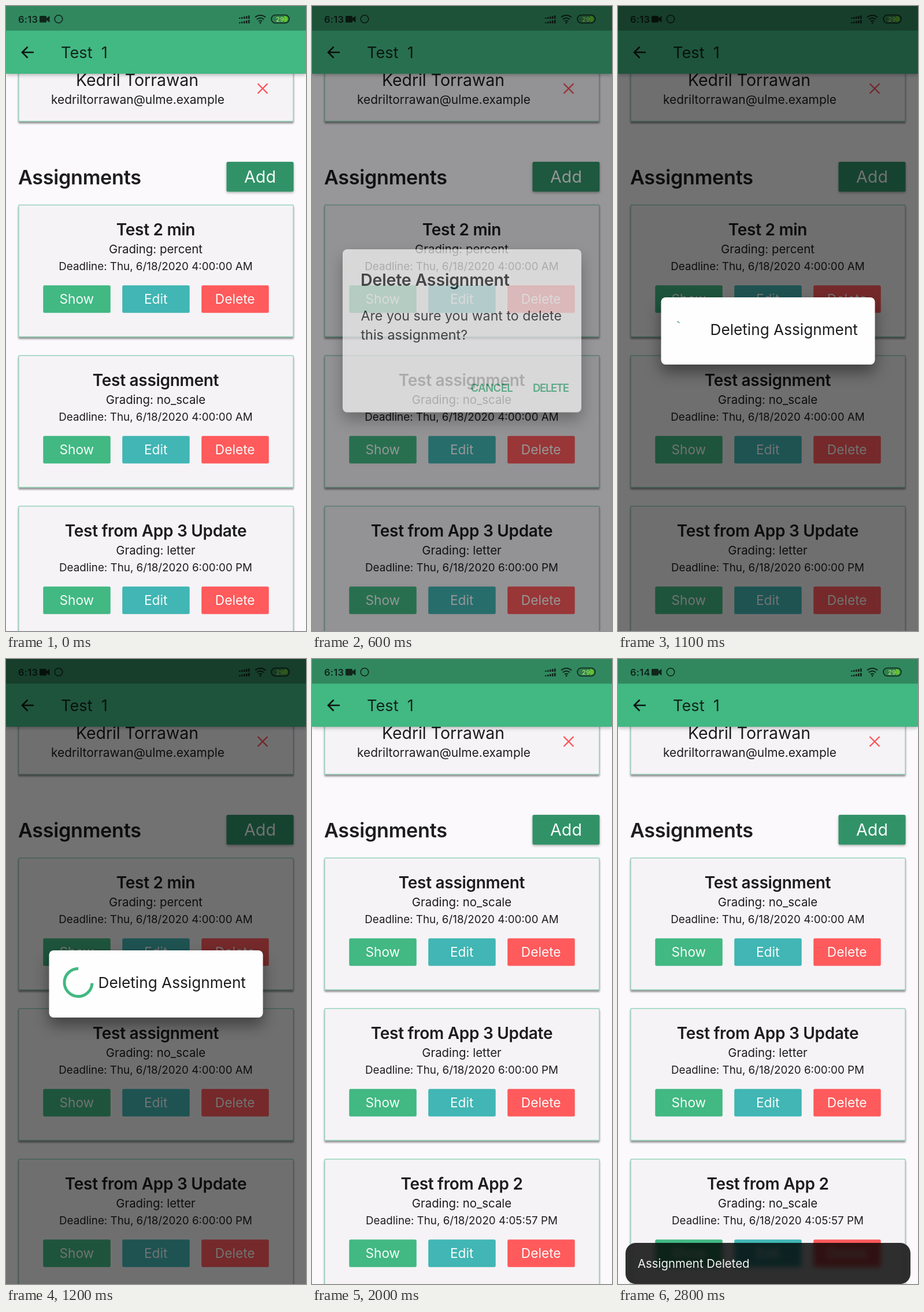
An HTML page for the animation above (2.9 s loop, 519 px wide and 1079 px high).

```html
<!DOCTYPE html>
<html lang="en">
<head>
<meta charset="utf-8">
<title>Delete assignment</title>
<style>
  html, body { margin: 0; width: 100%; height: 100%; overflow: hidden; background: #fbf9fc; }
  svg { position: absolute; left: 0; top: 0; display: block; }
  text { font-family: Inter, "Open Sans", sans-serif; white-space: pre; }
  .card { fill: #f5f3f6; stroke: #93d3b6; stroke-width: 1.3; filter: drop-shadow(0 3px 1.8px rgba(0,0,0,.42)); }
  .raised { filter: drop-shadow(0 2px 2px rgba(0,0,0,.3)); }
  .bar { filter: drop-shadow(0 2px 3px rgba(0,0,0,.28)); }
  .modal { fill: #fffeff; filter: drop-shadow(0 13px 13px rgba(0,0,0,.42)); }
  #snack {
    position: absolute; left: 13px; top: 1007.5px; width: 471.5px; height: 71.5px;
    padding-left: 21px; border-radius: 18px; line-height: 71px;
    font-family: Inter, "Open Sans", sans-serif; font-size: 20.4px; color: #f2f2f2;
    background: rgba(0,0,0,.81); backdrop-filter: blur(4px); white-space: pre;
  }
</style>
</head>
<body>
<svg id="stage" width="519" height="1079" viewBox="0 0 519 1079"></svg>
<div id="snack">Assignment Deleted</div>
<script>
const LOOP = 2900, STEP = 100;
const INK = '#1d1c1e', GREEN = '#42b883', TEAL = '#41b6b4', RED = '#ff5a5c';

const label = (x, y, size, str, { fill = INK, weight = 400, anchor = 'start', spacing = 0, id = '' } = {}) =>
  `<text ${id && `id="${id}"`} x="${x}" y="${y}" font-size="${size}" fill="${fill}" font-weight="${weight}"
    text-anchor="${anchor}" letter-spacing="${spacing}">${str}</text>`;
const centred = (x, y, size, str, more) => label(x, y, size, str, { anchor: 'middle', ...more });
const rect = (x, y, w, h, fill, r = 0, cls = '') =>
  `<rect x="${x}" y="${y}" width="${w}" height="${h}" rx="${r}" fill="${fill}" class="${cls}"/>`;
const line = (d, stroke, width) => `<path d="${d}" fill="none" stroke="${stroke}" stroke-width="${width}"/>`;

const button = (x, y, str, fill) =>
  rect(x, y, 116.5, 47.5, fill, 2.5) + centred(x + 58, y + 31.5, 22.7, str, { fill: '#f7fbf9' });

function card(y, [title, grading, deadline]) {
  return rect(22, y + .5, 475, 227.5, '', 1, 'card') +
    centred(259, y + 52.5, 28, title, { weight: 600, spacing: -.3 }) +
    centred(259, y + 84, 20.4, `Grading: ${grading}`) +
    centred(259, y + 113, 18.8, `Deadline: Thu, 6/18/2020 ${deadline}`) +
    button(64.3, y + 139.3, 'Show', GREEN) +
    button(201.2, y + 139.3, 'Edit', TEAL) +
    button(338.2, y + 139.3, 'Delete', RED);
}

const assignments = [
  ['Test 2 min', 'percent', '4:00:00 AM'],
  ['Test assignment', 'no_scale', '4:00:00 AM'],
  ['Test from App 3 Update', 'letter', '6:00:00 PM'],
  ['Test from App 2', 'no_scale', '4:05:57 PM'],
];
const cardList = first =>
  assignments.slice(first, first + 3).map((item, i) => card(343 + i * 260, item)).join('');

function statusBar() {
  const dark = '#10251b';
  let signal = '';
  for (let i = 0; i < 5; i++) {
    const x = 403 + i * 4;
    signal += rect(x, 20 - i * .9, 2.6, 2 + i * .9, dark) + rect(x, 28 - i, 2.6, 2 + i, dark);
  }
  return rect(0, 0, 519, 42.5, '#31885f') +
    label(21, 29, 16.5, '6:13', { fill: dark, weight: 600, spacing: .2, id: 'clock' }) +
    rect(58, 17, 12, 11.5, dark, 1.5) + `<path d="M70 21l5.5-4v11.5l-5.5-4z" fill="${dark}"/>` +
    `<circle cx="91" cy="22.5" r="6.8" fill="none" stroke="${dark}" stroke-width="1.6"/>` +
    signal +
    line('M431 19.5a13 13 0 0 1 18 0M434 23.2a8.8 8.8 0 0 1 12 0M437 26.6a4.6 4.6 0 0 1 6 0', dark, 2) +
    `<circle cx="440" cy="29" r="1.5" fill="${dark}"/>` +
    `<rect x="459" y="15.5" width="31" height="14" rx="7" fill="#2f7f52" stroke="${dark}" stroke-width="1.6"/>` +
    `<path d="M481 17.5h1.5a5 5 0 0 1 0 10h-1.5z" fill="#62c52c"/>` +
    centred(474, 26.5, 11, '29', { fill: '#9fdc62', weight: 600 });
}

const page =
  rect(0, 0, 519, 1079, '#fbf9fc') +
  rect(22, 60, 475, 139, '', 1, 'card') +
  centred(227, 137.5, 28.5, 'Kedril Torrawan') +
  centred(228, 169, 20.9, 'kedriltorrawan@ulme.example') +
  line('M435.5 134l17 17m0-17l-17 17', '#f8555a', 2.4) +
  label(21, 307.5, 34.2, 'Assignments', { weight: 600, spacing: -.3 }) +
  rect(381.5, 269, 116, 51.5, '#319268', 2.5, 'raised') +
  centred(439.5, 305, 28.7, 'Add', { fill: '#f4faf7' }) +
  `<g id="before">${cardList(0)}</g><g id="after">${cardList(1)}</g>` +
  rect(0, 42, 519, 75, GREEN, 0, 'bar') + statusBar() +
  line('M48 80H28.5M37.5 70.5L28 80l9.5 9.5', '#0b1510', 2.6) +
  label(95, 90, 27.2, 'Test  1', { fill: '#10251b' });

const confirmBox =
  rect(53, 420, 413, 281.5, '', 8, 'modal') +
  label(84, 482.5, 28.6, 'Delete Assignment', { weight: 600, spacing: -.2 }) +
  label(84.5, 543, 23.2, 'Are you sure you want to delete') +
  label(84.5, 576, 23.3, 'this assignment?') +
  label(274.5, 666, 18.6, 'CANCEL', { fill: GREEN, weight: 600, spacing: -.6 }) +
  label(382, 666, 18.6, 'DELETE', { fill: GREEN, weight: 600, spacing: -1.4 });

const progressBox =
  rect(74.5, 503, 370, 116, '', 8, 'modal') +
  `<path id="arc" fill="none" stroke="${GREEN}" stroke-width="5"/>` +
  label(159.5, 567.5, 26.2, 'Deleting Assignment');

document.getElementById('stage').innerHTML = page +
  '<rect id="scrim" width="519" height="1079"/>' +
  `<g id="confirm">${confirmBox}</g><g id="progress">${progressBox}</g>`;

const el = Object.fromEntries(
  ['before', 'after', 'clock', 'scrim', 'confirm', 'progress', 'arc', 'snack']
    .map(id => [id, document.getElementById(id)]));
const show = (node, visible) => { node.style.display = visible ? '' : 'none'; };

// Cubic bezier (.4, 0, .2, 1), solved by bisection.
function fastOutSlowIn(x) {
  x = Math.min(1, Math.max(0, x));
  let lo = 0, hi = 1, s = .5;
  for (let i = 0; i < 24; i++) {
    s = (lo + hi) / 2;
    const u = 1 - s;
    if (1.2 * u * u * s + .6 * u * s * s + s ** 3 < x) lo = s; else hi = s;
  }
  return s * s * (3 - 2 * s);
}

function spinnerPath(cycles) {
  const turn = Math.floor(cycles) % 5, p = cycles % 1;
  const head = fastOutSlowIn(p * 2), tail = fastOutSlowIn(p * 2 - 1);
  const start = -90 + 270 * tail + 306 * p - 144 * turn;
  const sweep = Math.max(270 * (head - tail), 2);
  const at = deg => {
    const a = deg * Math.PI / 180;
    return `${125 + 24 * Math.cos(a)} ${558.5 + 24 * Math.sin(a)}`;
  };
  return `M${at(start)}A24 24 0 ${sweep > 180 ? 1 : 0} 1 ${at(start + sweep)}`;
}

// The picture advances in held steps of 100 ms.
function render(ms) {
  const t = Math.floor((ms % LOOP) / STEP) * STEP;
  const opening = t === 600;
  show(el.scrim, t >= 600 && t < 2000);
  el.scrim.style.opacity = opening ? .4 : .54;
  show(el.confirm, t >= 600 && t < 1100);
  el.confirm.style.opacity = opening ? .65 : 1;
  show(el.progress, t >= 1100 && t < 2000);
  el.arc.setAttribute('d', spinnerPath(3.53 + (t - 1200) * .004917 + 5));
  show(el.before, t < 2000);
  show(el.after, t >= 2000);
  show(el.snack, t >= 2100);
  el.clock.textContent = t < 2200 ? '6:13' : '6:14';
}

const began = performance.now();
function tick() {
  render(performance.now() - began);
  requestAnimationFrame(tick);
}
tick();
</script>
</body>
</html>
```
